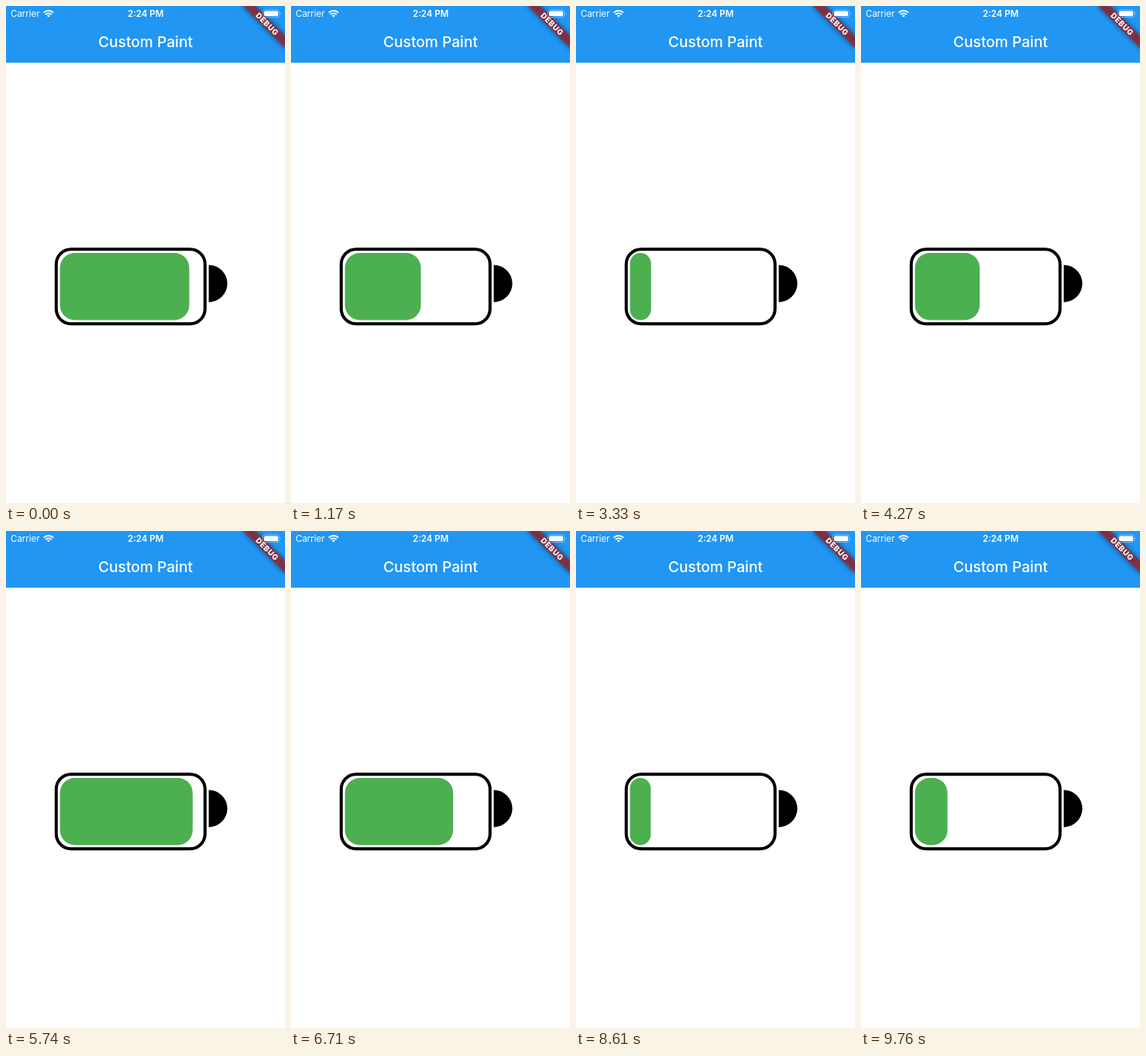
Write an HTML page that moves like this. It is 360 px wide and 640 px high and loops after 9.8 s.

```html
<!DOCTYPE html>
<html lang="en">
<head>
<meta charset="utf-8">
<title>Custom Paint</title>
<style>
  html, body { margin: 0; width: 100%; height: 100%; overflow: hidden; background: #fff; }
  svg { display: block; width: 360px; height: 640px; }
  text { font-family: Inter, Roboto, sans-serif; fill: #fff; }
</style>
</head>
<body>
<svg viewBox="0 0 360 640">
  <defs>
    <filter id="blur" x="-50%" y="-150%" width="200%" height="400%">
      <feGaussianBlur stdDeviation="3.8"/>
    </filter>
  </defs>

  <rect width="360" height="73" fill="#2196f3"/>
  <text x="180" y="52.6" font-size="19.2" font-weight="500" text-anchor="middle">Custom Paint</text>

  <!-- battery -->
  <rect x="64.8" y="313.2" width="192" height="96" rx="19.2" fill="none" stroke="#000" stroke-width="4"/>
  <path d="M261.6 333.4a24 24 0 0 1 0 48z"/>
  <rect id="charge" x="69.6" y="318" height="86.4" fill="#4caf50"/>

  <!-- corner banner -->
  <g transform="translate(360 0) rotate(45)">
    <rect x="-38.4" y="26.9" width="76.8" height="11.5" fill-opacity=".5" filter="url(#blur)"/>
    <rect x="-38.4" y="26.9" width="76.8" height="11.5" fill="#b71c1c" fill-opacity=".627"/>
    <text x=".3" y="36.2" font-size="9.8" font-weight="800" letter-spacing=".6" text-anchor="middle">DEBUG</text>
  </g>

  <!-- status bar -->
  <text x="6" y="14" font-size="11.5">Carrier</text>
  <text x="180.2" y="14" font-size="11.5" font-weight="600" text-anchor="middle">2:24 PM</text>
  <g fill="none" stroke="#fff" stroke-width="1.9">
    <path d="M48.7 8.6a8.8 8.8 0 0 1 12.4 0M51 11a5.5 5.5 0 0 1 7.8 0"/>
    <path d="M52.9 12.4a2.9 2.9 0 0 1 4 0l-2 2.1z" fill="#fff" stroke="none"/>
  </g>
  <rect x="331.5" y="4.9" width="21" height="9.6" rx="2.6" fill="none" stroke="#fff" stroke-opacity=".38"/>
  <rect x="333" y="6.4" width="18" height="6.6" rx="1.5" fill="#fff"/>
  <path d="M353.9 8v3.4a2 2 0 0 0 0-3.4z" fill="#fff" fill-opacity=".45"/>
</svg>
<script>
  const LOOP = 9800, STEP = 106;
  const FULL = 183.6, RADIUS = 19.2;
  const SWEEP = 3108;   // ms from full to empty
  const EMPTY = 2825;   // first time the charge is empty
  const charge = document.getElementById('charge');

  // Triangle wave: drains and refills at constant speed
  function widthAt(t) {
    const phase = (t - EMPTY + 2 * SWEEP) % (2 * SWEEP) / SWEEP;
    return FULL * (1 - Math.abs(1 - phase));
  }

  function draw(time) {
    const held = Math.floor(time % LOOP / STEP) * STEP;
    const width = widthAt(held);
    charge.setAttribute('width', width);
    charge.setAttribute('rx', Math.min(RADIUS, width / 2));
    charge.setAttribute('ry', Math.min(RADIUS, width / 2));
  }

  const start = performance.now();
  function tick() {
    draw(performance.now() - start);
    requestAnimationFrame(tick);
  }
  tick();
</script>
</body>
</html>
```
